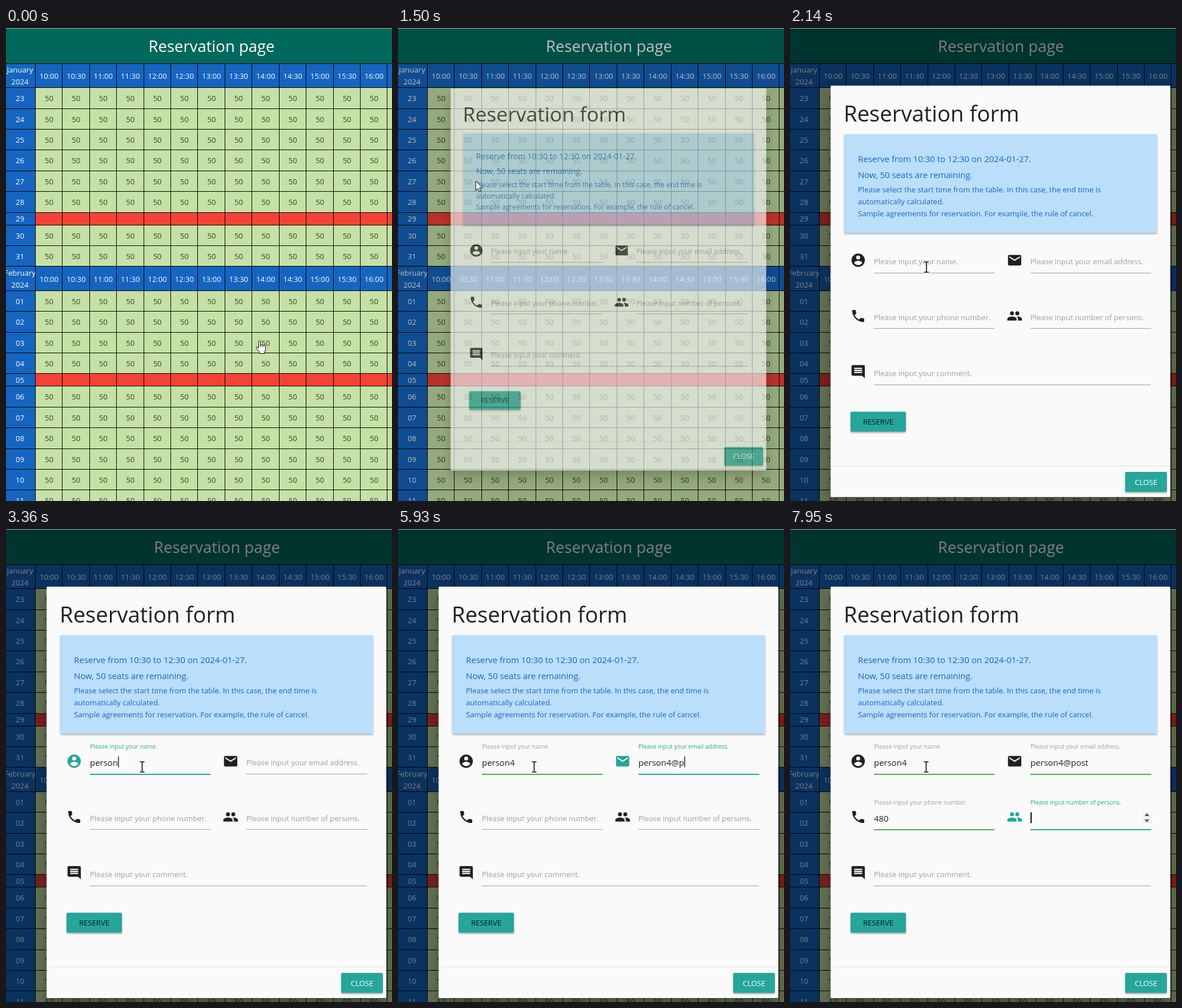
An HTML page for the animation above (8000 ms loop, 676x829 px).

```html
<!DOCTYPE html>
<html lang="en">
<head>
<meta charset="utf-8">
<title>Reservation page</title>
<style>
html, body { margin: 0; width: 100%; height: 100%; overflow: hidden; }
svg { display: block; width: 100vw; height: 100vh; font-family: "Open Sans", "Noto Sans", sans-serif; }
.raised { filter: drop-shadow(0 2px 1.5px rgba(0, 0, 0, .3)); }
.sheet { filter: drop-shadow(0 10px 10px rgba(0, 0, 0, .3)); }
</style>
</head>
<body>
<svg id="stage" viewBox="0 0 676 829"></svg>
<script>
const LOOP = 8000, OPEN = 1430, STEP = 68.6;
const TEAL = [38, 166, 154], GREEN = [76, 175, 80], GRAY = [158, 158, 158], INK = [33, 33, 33];
const BLUE = '#1565c0';

const clamp = v => Math.min(1, Math.max(0, v));
const lerp = (a, b, k) => a + (b - a) * k;
const mix = (a, b, k) => `rgb(${a.map((v, i) => Math.round(lerp(v, b[i], k)))})`;
const set = (node, attrs) => { for (const k in attrs) node.setAttribute(k, attrs[k]); };
const show = (node, on) => set(node, { display: on ? 'inline' : 'none' });

function el(parent, tag, attrs = {}) {
  const node = document.createElementNS('http://www.w3.org/2000/svg', tag);
  set(node, attrs);
  return parent.appendChild(node);
}
const rect = (p, x, y, width, height, fill, more) => el(p, 'rect', { x, y, width, height, fill, ...more });
function text(p, str, x, y, size, fill, more) {
  const node = el(p, 'text', { x, y, fill, 'font-size': size * .935, ...more });
  node.textContent = str;
  return node;
}
const MID = { 'text-anchor': 'middle' };

// Timetable
const stage = document.getElementById('stage');
rect(stage, 0, 0, 676, 829, '#c5e1a5');
rect(stage, 0, 0, 676, 62, '#00695c');
const title = text(stage, 'Reservation page', 360, 42, 29.4, '#fff', MID);

const colX = i => 51.4 + 47.43 * i;
const cells = (y, label, fill) => {
  for (let i = 0; i < 13; i++) text(stage, label(i), colX(i) + 24, y, 14, fill, MID);
};
const clock = i => `${10 + (i >> 1)}:${i % 2 ? '30' : '00'}`;
const lines = [];
let y = 62.2;
for (const [month, first, last, closed] of [['January', 23, 31, 29], ['February', 1, 11, 5]]) {
  rect(stage, 0, Math.floor(y), 676, 43, BLUE);
  text(stage, month, 24.5, y + 16, 14, '#fff', MID);
  text(stage, '2024', 24.5, y + 37, 14, '#fff', MID);
  cells(y + 27, clock, '#fff');
  lines.push(y);
  y += 42.5;
  for (let day = first; day <= last; day++) {
    const h = day === closed ? 22 : 36.4;
    if (day === closed) rect(stage, 0, Math.floor(y), 676, 23, '#f44336');
    else cells(y + h / 2 + 5.2, () => '50', 'rgba(0,0,0,.72)');
    rect(stage, 0, Math.floor(y), 51, 38, BLUE);
    text(stage, String(day).padStart(2, '0'), 24.5, y + h / 2 + 5.2, 14, '#fff', MID);
    lines.push(y);
    y += h;
  }
}
for (const v of lines) rect(stage, 0, Math.floor(v), 676, 1, '#000');
for (let i = 0; i < 14; i++) rect(stage, Math.floor(colX(i)), 62, 1, 767, '#000');

const ripple = el(stage, 'circle', { cx: 131, cy: 268, fill: 'rgba(76,175,80,.25)' });
const shade = rect(stage, 0, 0, 676, 829, '#000');
rect(stage, 0, 0, 676, 1, '#b0b0b0');

// Dialog
const modal = el(stage, 'g');
rect(modal, 71, 101, 595, 721, '#fafafa', { rx: 2, class: 'sheet' });
text(modal, 'Reservation form', 94, 164, 40.9, 'rgba(0,0,0,.87)');
rect(modal, 95, 186, 548, 173, '#bbdefb', { rx: 2, class: 'raised' });
[
  ['Reserve from 10:30 to 12:30 on 2024-01-27.', 235, 16],
  ['Now, 50 seats are remaining.', 263, 16],
  ['Please select the start time from the table. In this case, the end time is', 288, 14],
  ['automatically calculated.', 309, 14],
  ['Sample agreements for reservation. For example, the rule of cancel.', 330, 14]
].forEach(([str, ty, size]) => text(modal, str, 119, ty, size, BLUE));

function button(label, x, by, w, h, fill) {
  rect(modal, x, by, w, h, '#26a69a', { rx: 2, class: 'raised' });
  text(modal, label, x + w / 2, by + h / 2 + 5, 14, fill, MID);
}
button('RESERVE', 106, 672.5, 97, 35, 'rgba(0,0,0,.87)');
button('CLOSE', 587, 778, 73, 35, '#fff');
rect(modal, 71, 767, 595, 1, 'rgba(0,0,0,.1)');

const ICONS = {
  user: 'M12 2a10 10 0 1 0 0 20a10 10 0 1 0 0-20zm0 3a3 3 0 1 1 0 6a3 3 0 1 1 0-6zm0 14.2c-2.5 0-4.7-1.3-6-3.2c0-2 4-3.1 6-3.1s6 1.1 6 3.1c-1.3 1.9-3.5 3.2-6 3.2z',
  mail: 'M20 4H4a2 2 0 0 0-2 2v12a2 2 0 0 0 2 2h16a2 2 0 0 0 2-2V6a2 2 0 0 0-2-2zm0 4l-8 5-8-5V6l8 5 8-5z',
  phone: 'M6.6 10.8c1.5 2.8 3.8 5.1 6.6 6.6l2.2-2.2q.5-.5 1-.3 1.7.6 3.6.6a1 1 0 0 1 1 1V20a1 1 0 0 1-1 1A17 17 0 0 1 3 4a1 1 0 0 1 1-1h3.5a1 1 0 0 1 1 1q0 1.9.6 3.6.2.5-.3 1z',
  group: 'M16 5a3 3 0 1 0 0 6a3 3 0 1 0 0-6zM8 5a3 3 0 1 0 0 6a3 3 0 1 0 0-6zm0 8c-2.3 0-7 1.2-7 3.5V19h14v-2.5C15 14.2 10.3 13 8 13zm8 0l-1 .1c1.2.8 2 1.9 2 3.4V19h6v-2.5c0-2.3-4.7-3.5-7-3.5z',
  note: 'M22 4a2 2 0 0 0-2-2H4a2 2 0 0 0-2 2v12a2 2 0 0 0 2 2h14l4 4zM18 14H6v-2h12zm0-3H6V9h12zm0-3H6V6h12z'
};

const IDLE = { focus: Infinity, blur: Infinity, value: '', keys: [], width: 211.5, caret: 1.3 };
const fields = [
  { icon: 'user', hint: 'your name', x: 147, row: 0, focus: 2210, blur: 4030, value: 'person4',
    keys: [2890, 2960, 3030, 3230, 3300, 3355, 3760] },
  { icon: 'mail', hint: 'your email address', x: 421, row: 0, focus: 4030, blur: 6340, value: 'person4@post',
    keys: [4370, 4510, 4640, 4780, 4850, 4920, 5200, 5600, 5930, 6060, 6130, 6270] },
  { icon: 'phone', hint: 'your phone number', x: 147, row: 1, focus: 6340, blur: 7740, value: '480',
    keys: [6940, 7150, 7350] },
  { icon: 'group', hint: 'number of persons', x: 421, row: 1, focus: 7740, caret: 2 },
  { icon: 'note', hint: 'your comment', x: 147, row: 2, width: 485 }
].map(f => ({ ...IDLE, ...f, dy: f.row * 98 }));

for (const f of fields) {
  f.mark = el(modal, 'path', {
    d: ICONS[f.icon], 'fill-rule': 'evenodd',
    transform: `translate(${f.x - 41.6} ${393 + f.row * 97.7}) scale(1.1667)`
  });
  f.rule = rect(modal, f.x, [429, 526, 625][f.row], f.width, 1);
  f.label = text(modal, `Please input ${f.hint}.`, 0, 0, 14);
  f.input = text(modal, '', f.x, 414.5 + f.dy, 16, 'rgba(0,0,0,.87)');
  f.bar = rect(modal, f.x, 398.5 + f.dy, f.caret, 19, '#000');
}
const spinner = el(modal, 'g');
rect(spinner, 618, 496, 15, 20, '#f0f0f0');
el(spinner, 'path', { d: 'M621 503l4-5 4 5zM621 509l4 5 4-5z', fill: '#505050' });

function drawField(f, t, now) {
  const on = clamp((now - f.focus) / 200), off = clamp((now - f.blur) / 200);
  const rise = 1 - (1 - on) ** 2;
  const active = on * (1 - off);
  const typed = f.value.slice(0, f.keys.filter(k => t >= k).length);
  set(f.mark, { fill: mix(INK, TEAL, active) });
  set(f.label, {
    fill: mix(GRAY, TEAL, active),
    transform: `translate(${f.x} ${lerp(413.5, 385, rise) + f.dy}) scale(${lerp(1, .8, rise)})`
  });
  set(f.rule, {
    fill: t >= f.blur ? mix(TEAL, GREEN, off) : mix(GRAY, TEAL, on),
    height: t >= f.focus ? 2 : 1
  });
  f.input.textContent = typed;
  show(f.bar, t >= f.focus && t < f.blur);
  set(f.bar, { x: f.x + .3 + (typed ? f.input.getComputedTextLength() : 0) });
}

// Pointer
const OUTLINE = { fill: '#fff', stroke: '#000', 'stroke-width': 1, 'stroke-linejoin': 'round' };
const hand = el(stage, 'g');
el(hand, 'path', {
  ...OUTLINE,
  d: 'M-1.5 13V1.5a1.6 1.6 0 0 1 3.2 0V7.6a1.6 1.6 0 0 1 3 .4a1.6 1.6 0 0 1 3 .6a1.4 1.4 0 0 1 2.8.8V15q0 3-2 5v2.5H0V20L-5.4 13.6q-1-1.8.4-2.4t2 .6z'
});
el(hand, 'path', { d: 'M1.7 7v4M4.7 8v3M7.7 8.6v2.4', stroke: '#000' });
const arrow = el(stage, 'path', { ...OUTLINE, d: 'M0 0V17l4-4 2.6 6 2.6-1.1L6.6 12H12z' });
const beam = el(stage, 'g');
for (const [stroke, w] of [['#fff', 3.5], ['#000', 1.6]]) {
  el(beam, 'path', {
    d: 'M-4-9h2.5q1.5 0 1.5 1V8q0 1-1.5 1H-4M4-9H1.5Q0-9 0-8V8q0 1 1.5 1H4',
    fill: 'none', stroke, 'stroke-width': w
  });
}

const PATH = [
  [200, 444, 548], [950, 142, 277], [1430, 132, 265], [1498, 136, 268],
  [1780, 198, 339], [2000, 239, 419], [2150, 239, 419], [2210, 238.5, 417]
];
function pointerAt(t) {
  const i = PATH.findIndex(p => p[0] > t);
  if (i < 1) return PATH.at(i).slice(1);
  const [a, b] = [PATH[i - 1], PATH[i]];
  let k = (t - a[0]) / (b[0] - a[0]);
  if (i === 1) k = k * k * (3 - 2 * k);
  return [lerp(a[1], b[1], k), lerp(a[2], b[2], k)];
}

function draw(t) {
  // motion advances in steps, like a screen recording
  const now = OPEN + STEP * Math.floor((t - OPEN) / STEP + .03);
  const p = clamp((now - OPEN) / 235);
  const k = 1 - (1 - p) ** 3;

  set(title, { x: t < OPEN ? 360 : 369.5 });
  set(ripple, { r: t < 1360 || t >= 1498 ? 0 : t < OPEN ? 6 : 12 });
  set(shade, { opacity: .5 * (1 - (1 - p) ** 2) });
  show(modal, k > 0);
  set(modal, {
    opacity: k,
    transform: `translate(368.5 ${lerp(402.5, 461.5, k)}) scale(${lerp(.8, 1, k)}) translate(-368.5 -461.5)`
  });
  for (const f of fields) drawField(f, t, now);
  show(spinner, t >= 7740);

  const shape = t < 1498 ? hand : t < 1960 ? arrow : beam;
  for (const s of [hand, arrow, beam]) show(s, s === shape);
  set(shape, { transform: `translate(${pointerAt(now)})` });
}

function tick() {
  draw(performance.now() % LOOP);
  requestAnimationFrame(tick);
}
tick();
</script>
</body>
</html>
```
